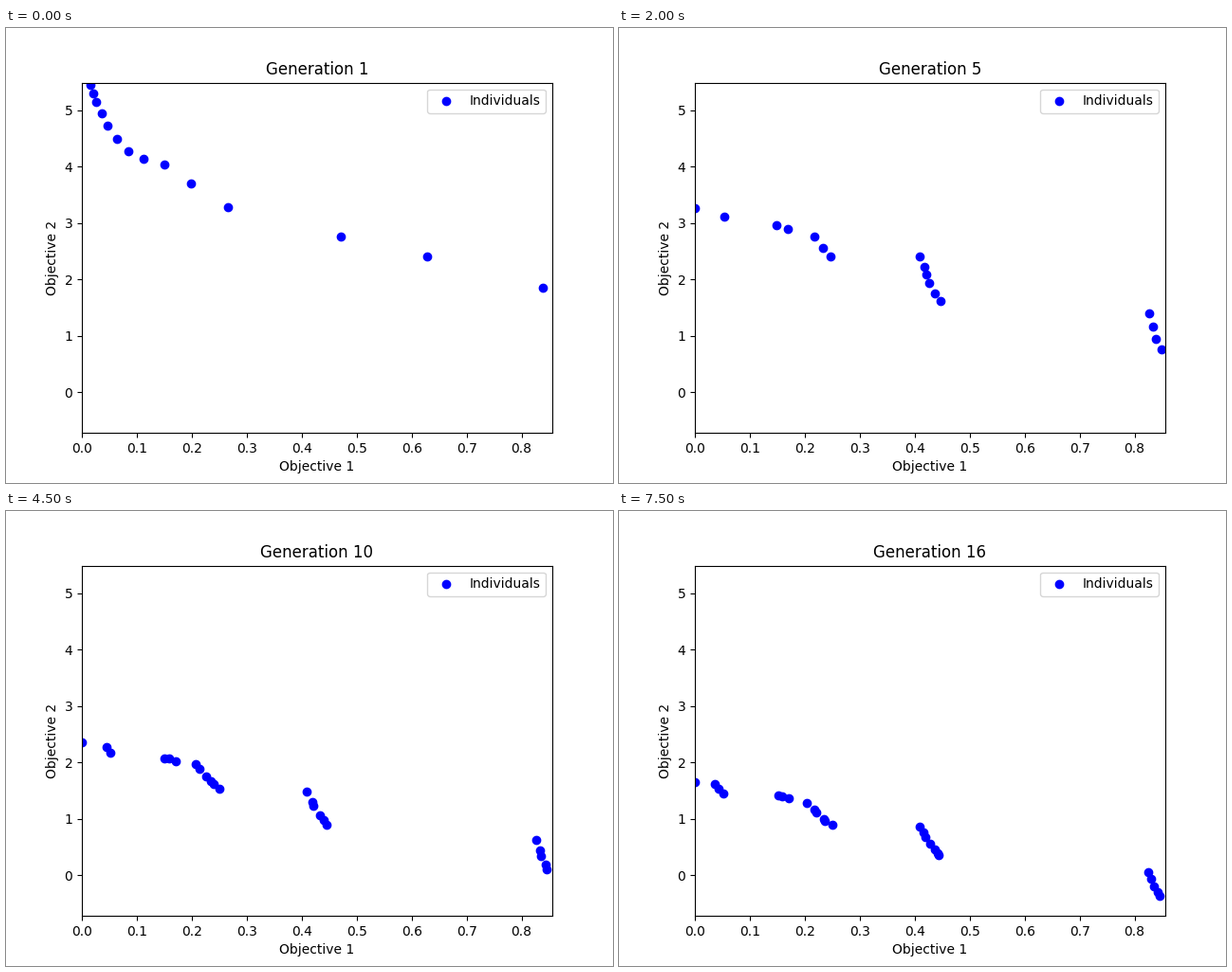
A matplotlib script that plays this animation: 640 px wide and 480 px high, repeating every 8000 ms.

```python
import numpy as np
import matplotlib.pyplot as plt
from matplotlib.animation import FuncAnimation

GENERATIONS = 16
STEP_MS = 500

# Each niche on the disconnected front:
# first x, last x, distance factor at both ends, full size
NICHES = [
    (0, 0, 1, 1, 1),
    (.036, .052, 1.16, 1.1, 3),
    (.15, .17, 1.08, 1.08, 3),
    (.207, .248, 1.18, 1.1, 6),
    (.406, .443, 1.15, 1, 8),
    (.826, .847, 1.16, 1, 5),
]


def best_distance(gen):
    """Smallest distance term g reached so far; 1 is the true optimum."""
    return np.interp(gen, [1, 3, 5, 7, 9, 12, 16],
                     [4.6, 4, 3.27, 2.75, 2.52, 2.04, 1.65])


def objective2(x, g):
    """Disconnected test function: g * (1 - sqrt(x/g) - x/g * sin(10 pi x))."""
    return g - np.sqrt(x * g) - x * np.sin(10 * np.pi * x)


def initial_spread():
    x = np.geomspace(.015, .838, 15)
    return x, 1 + .32 * np.exp(-x / .06)


def niche_spread(gen):
    rng = np.random.default_rng(gen)
    fill = min(1, .5 + gen / 24)
    xs, factors = [], []
    for lo, hi, far, near, size in NICHES:
        n = max(1, round(size * fill))
        jitter = rng.uniform(-.1, .1, n) * (hi - lo)
        xs.append(np.linspace(hi, lo, n) + jitter)
        factors.append(np.linspace(near, far, n))
    return np.concatenate(xs), np.concatenate(factors)


def population(gen):
    """Non-dominated individuals of one generation."""
    x, factor = initial_spread() if gen == 1 else niche_spread(gen)
    y = objective2(x, best_distance(gen) * factor)
    order = np.argsort(x)
    pts = np.column_stack([x, y])[order]
    lowest = np.minimum.accumulate(pts[:, 1])
    return pts[pts[:, 1] <= lowest]


fig, ax = plt.subplots(figsize=(6.4, 4.8), dpi=100)
dots = ax.scatter([], [], color="blue", label="Individuals")
ax.set_xlim(0, .85605)
ax.set_ylim(-.72, 5.49)
ax.set_xlabel("Objective 1")
ax.set_ylabel("Objective 2")
ax.legend(loc="upper right")
title = ax.set_title("Generation 1")


def update(i):
    gen = i + 1
    dots.set_offsets(population(gen))
    title.set_text(f"Generation {gen}")
    return dots, title


anim = FuncAnimation(fig, update, frames=GENERATIONS, interval=STEP_MS, repeat=True)
plt.show()
```
